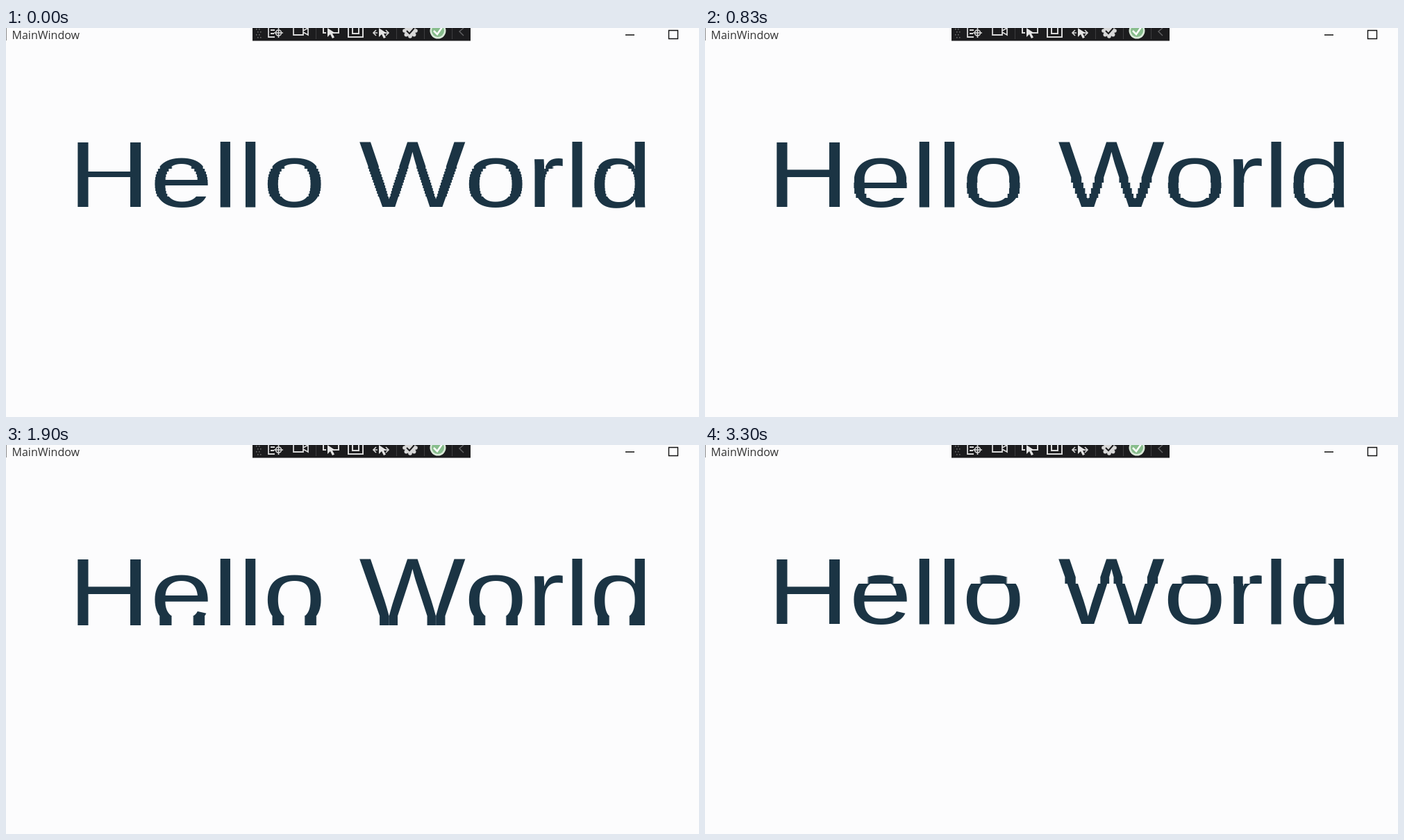
An HTML page with a canvas for the animation above (3330 ms loop, 998 by 561 pixels).

```html
<!DOCTYPE html>
<html lang="en">
<head>
<meta charset="utf-8">
<title>MainWindow</title>
<style>
  html, body { margin: 0; width: 100%; height: 100%; overflow: hidden; background: #fcfcfd; }
  canvas { display: block; }
</style>
</head>
<body>
<canvas id="stage" width="998" height="561"></canvas>
<script>
const WIDTH = 998, HEIGHT = 561, LOOP = 3330;
const INK = '#1b3444', PAPER = '#fcfcfd';
const view = document.getElementById('stage').getContext('2d');
const scene = document.createElement('canvas');
scene.width = WIDTH;
scene.height = HEIGHT;
const pen = scene.getContext('2d');

function box(x, y, w, h, color) {
  pen.fillStyle = color;
  pen.fillRect(x, y, w, h);
}

function line(path, color = '#d8d8d8', width = 2) {
  pen.strokeStyle = color;
  pen.lineWidth = width;
  pen.stroke(new Path2D(path));
}

function disc(x, y, r, color) {
  pen.fillStyle = color;
  pen.beginPath();
  pen.arc(x, y, r, 0, 7);
  pen.fill();
}

function pointer(x, y) {
  pen.fillStyle = '#e4e4e4';
  pen.fill(new Path2D(`M${x} ${y}v13l4-4 3 6 3-1.5-3-5.5h5z`));
}

function drawToolbar() {
  box(355, 0, 314, 18.5, '#1c1c1e');
  for (let y = 1; y < 17; y += 4)
    for (let x = 360; x < 368; x += 4) box(x + (y % 8 > 4 ? 2 : 0), y, 1.5, 1.5, '#707070');
  for (const x of [446, 562, 602, 642]) box(x, 0, 1, 16, '#3c3c3e');

  line('M378 0V13H387M381 3h6M381 8h5', undefined, 1.8);
  line('M386 7h13M392.5 0v14M388.5 7a4 4 0 1 0 8 0a4 4 0 1 0-8 0', undefined, 1.6);
  line('M414 0V10H428V0M428 4L435 0V10L428 6', undefined, 1.8);
  line('M457 0V7H461M472 7H479V0');
  pointer(463, 0);
  line('M493 0V13H514V0M499 0V8H508V0');
  line('M529 7H535M533 3L529 7l4 4M545 7H551M547 3l4 4-4 4', undefined, 1.6);
  pointer(537, 0);
  for (let i = 0; i < 8; i++) {
    const a = i * Math.PI / 4;
    disc(582 + 8 * Math.cos(a), 4 + 8 * Math.sin(a), 2.8, '#d8d8d8');
  }
  disc(582, 4, 8, '#d8d8d8');
  line('M577 4l4 4 7-8', '#1c1c1e');
  disc(622, 4, 11.5, '#d9ead9');
  disc(622, 4, 9, '#88bd8d');
  line('M616 4l5 5 7-10', '#fff', 2.5);
  line('M659 0L653 5L659 11', '#626264', 1.4);
}

function drawScene() {
  box(0, 0, WIDTH, HEIGHT, PAPER);
  box(0, 0, 1, 18, '#8c8c8c');
  pen.fillStyle = '#333';
  pen.font = '16px "Open Sans", "Noto Sans", sans-serif';
  pen.fillText('MainWindow', 8.5, 16);
  line('M892 10H905M954.5 3.5H967.5V15.5H954.5Z', '#111', 1.4);
  drawToolbar();

  // Wide lettering; capitals reach the ascender line.
  pen.font = '130px "Liberation Sans", Arial, sans-serif';
  pen.fillStyle = INK;
  for (const [text, x, rise] of [['H', 90, 1.04], ['ello', 207.5, 1], ['W', 508.5, 1.04], ['orld', 660, 1]]) {
    pen.setTransform(1.25, 0, 0, rise, x, 258);
    pen.fillText(text, 0, 0);
  }
  pen.resetTransform();
}

// Coarse-row band: time, top, height, row height
const path = [
  [0, 199, 44, 4], [570, 194, 49, 7], [1100, 238, 10, 9], [1900, 246, 14, 14],
  [2330, 203, 40, 4], [2870, 167, 14, 14], [3300, 190, 10, 10], [LOOP, 199, 44, 4]
];

function bandAt(time) {
  const i = path.findIndex(key => key[0] > time);
  const a = path[i - 1], b = path[i];
  const p = (time - a[0]) / (b[0] - a[0]);
  const ease = (1 - Math.cos(Math.PI * p)) / 2;
  return [1, 2, 3].map(k => Math.round(a[k] + (b[k] - a[k]) * ease));
}

function frame() {
  const [top, height, step] = bandAt(performance.now() % LOOP);
  view.drawImage(scene, 0, 0);
  // Each coarse row repeats its own first pixel row.
  for (let y = top; y < top + height; y += step) {
    const rows = Math.min(step, top + height - y);
    view.drawImage(scene, 0, y, WIDTH, 1, 0, y, WIDTH, rows);
  }
  requestAnimationFrame(frame);
}

view.imageSmoothingEnabled = false;
drawScene();
frame();
</script>
</body>
</html>
```
